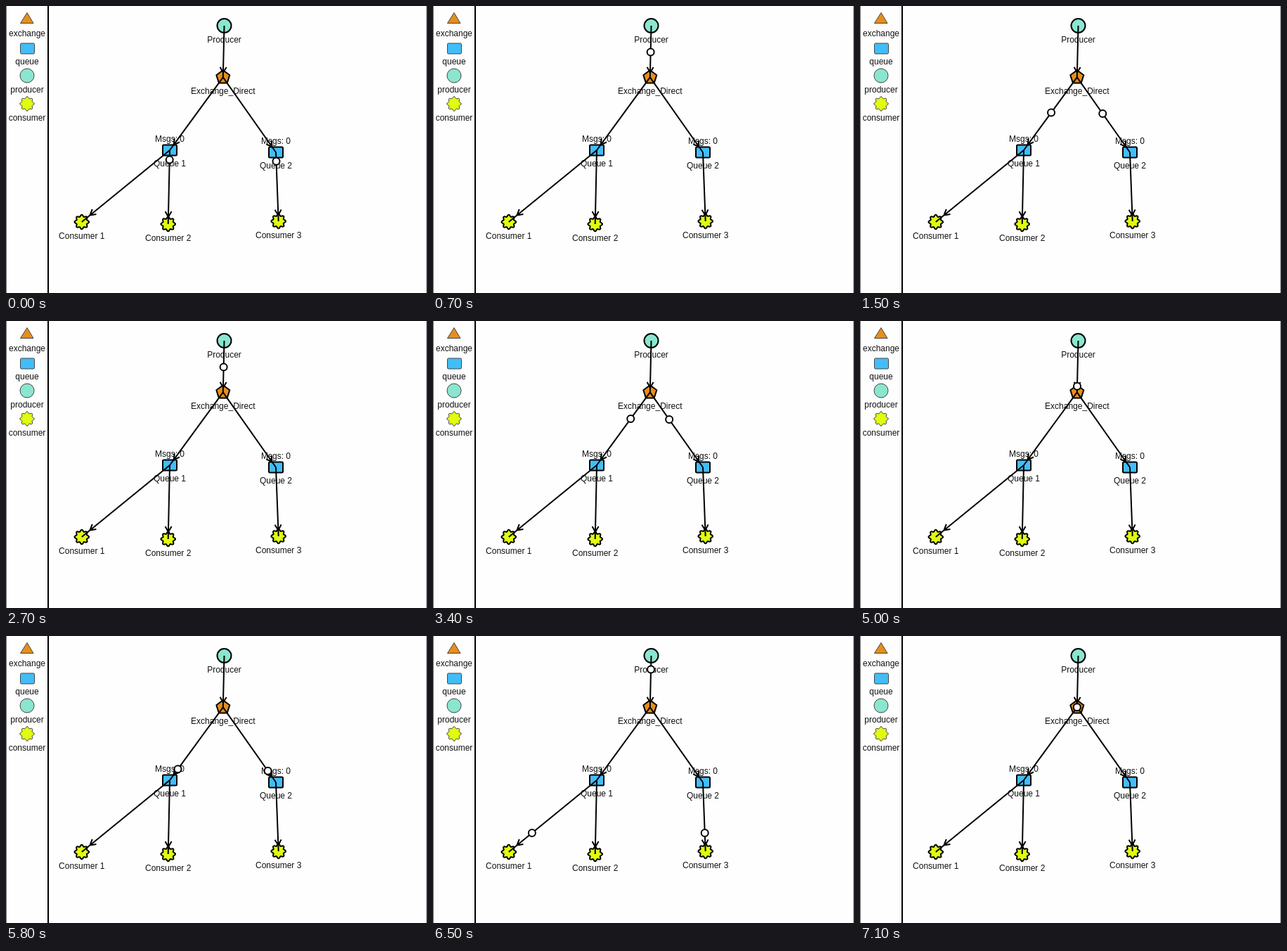
Write an HTML page that moves like this. It is 599x408 px and loops after 7200 ms.

```html
<!DOCTYPE html>
<html lang="en">
<head>
<meta charset="utf-8">
<title>Message routing</title>
<style>
  html, body { margin: 0; width: 100%; height: 100%; overflow: hidden; background: #fefefe; }
  svg { display: block; width: 599px; height: 408px; }
  text { font: 12px Arial, "Liberation Sans", sans-serif; text-anchor: middle; fill: #111; }
  .node { stroke: #000; stroke-width: 2; stroke-linejoin: round; }
  .key { stroke: #444; stroke-width: 1; stroke-linejoin: round; }
  .edge { stroke: #000; stroke-width: 2; fill: none; }
  .msg { stroke: #000; stroke-width: 2; fill: #fff; }
  .exchange { fill: #e68e1c; }
  .queue { fill: #42bdf8; }
  .producer { fill: #8ae6cf; }
  .consumer { fill: #e0fc10; }
</style>
</head>
<body>
<svg id="stage" viewBox="0 0 599 408">
  <path d="M.5 0V408M598.5 0V408" stroke="#777"/>
  <path d="M60 0V408" stroke="#000" stroke-width="2"/>
</svg>
<script>
const stage = document.getElementById('stage');
const LOOP = 7200, STEP = 100, PERIOD = 2000, TRAVEL = 790;

function add(tag, attrs, text) {
  const el = document.createElementNS('http://www.w3.org/2000/svg', tag);
  for (const k in attrs) el.setAttribute(k, attrs[k]);
  if (text) el.textContent = text;
  return stage.appendChild(el);
}

// Closed outline with a radius that depends on the angle
function outline(x, y, count, radius) {
  const pts = [];
  for (let i = 0; i < count; i++) {
    const a = i / count * 2 * Math.PI - Math.PI / 2, r = radius(a);
    pts.push((x + r * Math.cos(a)).toFixed(2) + ' ' + (y + r * Math.sin(a)).toFixed(2));
  }
  return 'M' + pts.join('L') + 'Z';
}

const shapes = {
  producer: (x, y, c) => add('circle', { cx: x, cy: y, r: 10, class: c }),
  exchange: (x, y, c) => add('path', { d: outline(x, y, 5, () => 10), class: c }),
  queue: (x, y, c) => add('rect', { x: x - 10, y: y - 7.5, width: 20, height: 15, rx: 1.5, class: c }),
  consumer: (x, y, c) => add('path', { d: outline(x, y, 64, a => 9 + 1.3 * Math.cos(8 * a)), class: c })
};

const label = (x, y, text) => add('text', { x, y }, text);

// Legend
add('path', { d: 'M30 9.5L39 24.5H20.5Z', class: 'key exchange' });
shapes.queue(30.5, 60.5, 'key queue');
shapes.producer(30, 99, 'key producer');
shapes.consumer(30, 139, 'key consumer');
['exchange', 'queue', 'producer', 'consumer'].forEach((t, i) => label(30, 43 + 40 * i, t));

// Network
const nodes = {
  p: [310.5, 28, 'producer', 'Producer', 24],
  e: [308.8, 101.3, 'exchange', 'Exchange_Direct', 24],
  q1: [233, 205, 'queue', 'Queue 1', 23],
  q2: [384, 208, 'queue', 'Queue 2', 23],
  c1: [107.8, 307, 'consumer', 'Consumer 1', 24],
  c2: [230.7, 310, 'consumer', 'Consumer 2', 24],
  c3: [387.7, 306, 'consumer', 'Consumer 3', 24]
};
for (const [x, y, kind, text, drop] of Object.values(nodes)) {
  shapes[kind](x, y, 'node ' + kind);
  label(x, y + drop, text);
  if (kind === 'queue') label(x, y - 12, 'Msgs: 0');
}

function edge(from, to, gap) {
  const [x1, y1] = nodes[from], [x2, y2] = nodes[to];
  const a = Math.atan2(y2 - y1, x2 - x1);
  const at = (r, turn) => (x2 - r * Math.cos(a + turn)) + ' ' + (y2 - r * Math.sin(a + turn));
  const back = Math.hypot(gap + 8, 4.5), spread = Math.atan2(4.5, gap + 8);
  add('path', {
    d: `M${x1} ${y1}L${x2} ${y2}M${at(back, spread)}L${at(gap, 0)}L${at(back, -spread)}`,
    class: 'edge'
  });
}
edge('p', 'e', 6.5);
edge('e', 'q1', 9.5);
edge('e', 'q2', 9.5);
edge('q1', 'c1', 15);
edge('q1', 'c2', 10);
edge('q2', 'c3', 8.5);

// from, to, start, time for the full distance, repeat
const legs = [
  ['p', 'e', 285, 810, PERIOD],
  ['e', 'q1', 1100, 825, PERIOD],
  ['e', 'q2', 1100, 825, PERIOD],
  ['q1', 'c1', 1893, 825, 2 * PERIOD],
  ['q1', 'c2', 1893 + PERIOD, 825, 2 * PERIOD],
  ['q2', 'c3', 1893, 825, PERIOD]
].map(([from, to, start, span, every]) => ({
  a: nodes[from], b: nodes[to], start, span, every,
  dot: add('circle', { r: 5, class: 'msg' })
}));

function draw(t) {
  for (const { a, b, start, span, every, dot } of legs) {
    const local = ((t - start) % every + every) % every;
    const u = local / span;
    dot.setAttribute('visibility', local < TRAVEL ? 'visible' : 'hidden');
    dot.setAttribute('cx', a[0] + (b[0] - a[0]) * u);
    dot.setAttribute('cy', a[1] + (b[1] - a[1]) * u);
  }
}

const began = performance.now();
function tick() {
  const t = (performance.now() - began) % LOOP;
  draw(Math.floor(t / STEP) * STEP);
  requestAnimationFrame(tick);
}
tick();
</script>
</body>
</html>
```
